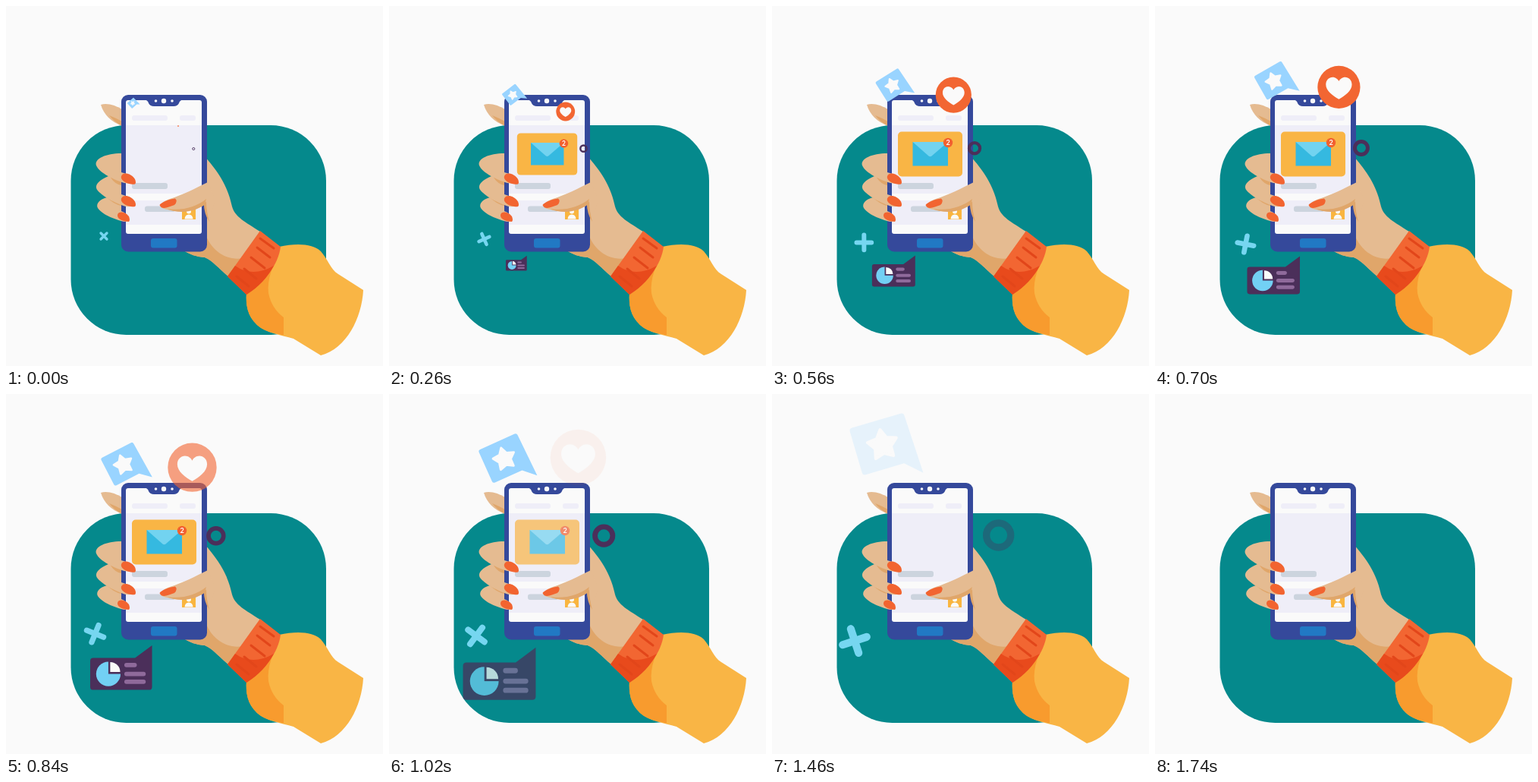
These frames come from a looping animation (497 px wide and 474 px high, 1.8 s). An HTML page:

```html
<!DOCTYPE html>
<html lang="en">
<head>
<meta charset="utf-8">
<title>Phone in hand</title>
<style>
html, body { margin: 0; width: 100%; height: 100%; overflow: hidden; background: #fafafa; }
svg { display: block; width: 497px; height: 474px; }
text { font: bold 9px Lato, Arial, sans-serif; }
.skin { fill: #e5bb91; }
.shade { fill: #e0a66a; }
.nail { fill: #f26430; }
.lilac { fill: #efeef8; }
.bar { fill: #ccd4de; }
.white { fill: #fafafa; }
.navy { fill: #35499b; }
.plum { fill: #4b2f5a; }
</style>
</head>
<body>
<svg viewBox="0 0 497 474">
  <rect x="85.500" y="157" width="336.500" height="276" rx="73" fill="#05898c"/>

  <!-- far finger and palm -->
  <path class="skin" d="M125 130C133 127 145 131 153 136V158C138 152 129 143 125 130Z"/>
  <path class="shade" d="M136 144Q146 148 153 152V158Q143 153 136 144Z"/>
  <path class="skin" d="M262 198C283 222 293 240 298 264C302 278 315 284 335 297L293 356C280 345 272 335 262 331C250 330 243 327 236 323L250 240Z"/>
  <path class="shade" d="M262 298C270 322 290 336 313 332L293 356C280 345 272 335 262 331C250 330 243 327 236 323Z"/>

  <!-- phone -->
  <rect class="navy" x="152" y="117" width="113" height="206.500" rx="9"/>
  <rect class="white" x="158" y="124" width="100" height="176" rx="3"/>
  <path class="navy" d="M183 123.500Q187 124 188 128Q190 132 195 132H221Q226 132 228 128Q229 124 233 123.500Z"/>
  <g class="white">
    <circle cx="197.500" cy="125" r="1.800"/><circle cx="208" cy="125" r="3.200"/><circle cx="219" cy="125" r="1.800"/>
  </g>
  <rect x="191" y="306" width="34.500" height="12.500" rx="3" fill="#2179c4"/>
  <g class="lilac">
    <rect x="166" y="144" width="47" height="7" rx="3"/>
    <rect x="229" y="144" width="21" height="7" rx="3"/>
    <rect x="158" y="157" width="100" height="90"/>
    <rect x="158" y="256" width="100" height="32"/>
  </g>
  <g class="bar">
    <rect x="166" y="233" width="47" height="8" rx="3"/>
    <rect x="183" y="263.500" width="40" height="7.500" rx="3"/>
  </g>
  <rect x="232" y="263" width="18" height="18" fill="#f9b53f"/>
  <g class="white">
    <circle cx="241" cy="270.500" r="3"/><path d="M235.500 280.500Q236 274.500 241 274.500T246.500 280.500Z"/>
  </g>

  <g id="card">
    <rect x="-42.500" y="-29.500" width="85" height="59" rx="5" fill="#f9b545"/>
    <rect x="-23" y="-16" width="46.500" height="31.500" fill="#35b9e0"/>
    <path d="M-23 -16H23.500L2 2.500Q0 4 -2 2.500Z" fill="#72d3f0"/>
    <circle cx="23.500" cy="-15" r="6.200" fill="#f2602f"/>
    <text x="23.500" y="-11.700" text-anchor="middle" fill="#fff">2</text>
  </g>

  <!-- front fingers -->
  <path class="skin" d="M152 254L133 252C123 255 119 260 120.500 265C125 274 143 281 156 284Q162 284 162 280Q160 273 152 270Z"/>
  <path class="shade" d="M133 252Q142 261 152 263V252Z"/>
  <path class="skin" d="M152 226L135 224C123 229 117 235 119.500 241C125 250 145 260 158 264Q168 265 170 260Q167 252 152 248Z"/>
  <path class="shade" d="M138 226Q144 235 152 236V226Z"/>
  <path class="skin" d="M152 194C132 194 116 201 119 210C123 220 143 229 156 233Q167 235 170 231Q167 222 152 219Z"/>
  <g class="nail">
    <path id="nail" d="M152 224C154 218 165 220 170 228Q172 233 170 234.500C164 236 150 231 152 224Z"/>
    <use href="#nail" y="29.500"/>
    <path d="M147 275C148 269 158 271 162 277Q164 282 162 284C156 284 146 281 147 275Z"/>
  </g>

  <!-- thumb -->
  <path class="skin" d="M266 232C250 240 232 249 216 254Q202 259 204 265C215 271 240 273 261 260Q262 272 268 284L276 255Z"/>
  <path class="shade" d="M212 267C232 270 250 265 264 254L261.500 262C245 273 225 273 212 267ZM261 261L264 257Q264 270 268 284Q261 274 261 261Z"/>
  <path class="nail" d="M202.500 262C204 259 216 254 223 253.500Q227 257 222 262C214 265 205 269 202.500 262Z"/>

  <!-- sleeve and cuff -->
  <path fill="#f9b545" d="M360 317C383 312 405 313 415 323C424 333 428 347 438 353L471 374C469 411 449 451 415 460L379 438C363 433 343 431 331 420C318 408 316 393 317 378Z"/>
  <path fill="#f89b2e" d="M360 326C352 340 344 360 346 378Q350 398 366 410V433.500C350 430 340 428 331 420C318 408 316 393 317 378Z"/>
  <path fill="#f26632" d="M335 296L362 317C359 340 341 365 317 380L292 356Z"/>
  <path fill="#e84a1c" d="M292 356L302 342Q325 358 353 342C345 357 333 370 317 380Z"/>
  <path stroke="#e2461a" stroke-width="3" stroke-linecap="round" d="M335 306L353 319M331 318L348 331M323 331L341 345M314 346L330 359M304 356L320 369"/>

  <!-- floating items -->
  <g id="chart">
    <path class="plum" d="M-38 -21.500H18.500L41.500 -38.500V17.500Q41.500 21.500 37.500 21.500H-38Q-42 21.500 -42 17.500V-17.500Q-42 -21.500 -38 -21.500Z"/>
    <circle cx="-17.500" r="16.500" fill="#72d0f4"/>
    <path class="plum" d="M-17.500 0V-17H0V0Z"/>
    <path class="white" d="M-15 -2.500V-16A13.500 13.500 0 0 1 -1.500 -2.500Z"/>
    <path stroke="#8f6a9b" stroke-width="6" stroke-linecap="round" d="M7 -12H18M7 0H30M7 10.500H30"/>
  </g>
  <path id="cross" d="M-16.500 0H16.500M0 -16.500V16.500" stroke="#76d6f0" stroke-width="10" stroke-linecap="round"/>
  <circle id="ring" r="15.500" fill="none" stroke="#4b2f5a" stroke-width="9"/>
  <g id="heart">
    <circle r="32" fill="#f26632"/>
    <path class="white" d="M0 18C-9 13 -19.500 5 -19.500 -4C-19.500 -11 -14.500 -15 -9.500 -15C-5 -15 -1.500 -12 0 -9C1.500 -12 5 -15 9.500 -15C14.500 -15 19.500 -11 19.500 -4C19.500 5 9 13 0 18Z"/>
  </g>
  <g id="star">
    <path fill="#99d4ff" d="M-32 -32.500H34Q38 -32.500 38 -28.500L40.500 50L20 31H-32Q-36 31 -36 27V-28.500Q-36 -32.500 -32 -32.500Z"/>
    <path id="starShape" class="white" stroke="#fafafa" stroke-width="4" stroke-linejoin="round"/>
  </g>
</svg>
<script>
const $ = id => document.getElementById(id);
const LOOP = 1800, STEP = 20, LAST = 1740;

const corners = Array.from({ length: 10 }, (_, i) => {
  const r = i % 2 ? 11 : 20, a = i * Math.PI / 5 + 0.12;
  return [r * Math.sin(a), -r * Math.cos(a)];
});
$("starShape").setAttribute("d", "M" + corners.join("L") + "Z");

// 1 until the first time, falling to 0 at the second
const fade = (s, from, to) => Math.max(0, Math.min(1, (to - s) / (to - from)));

function place(id, x, y, scale, turn, opacity) {
  const el = $(id);
  el.setAttribute("transform", `translate(${x} ${y}) rotate(${turn}) scale(${scale})`);
  el.setAttribute("opacity", opacity);
}

// Pose at s seconds: items drift outward at a steady speed while growing and turning
function draw(s) {
  const pop = 1 - (1 - Math.min(1, s / .35)) ** 2;
  place("card", 208.5, 195, pop, 0, fade(s, .94, 1.21));
  place("star", 167 - 14.5 * s, 128 - 41.8 * s, .15 + .59 * s, -42 + 17.5 * s, fade(s, 1.2, 1.525));
  place("heart", 227 + 22 * s, 158 - 73 * s, .035 + 1.45 * s - .35 * s * s, 0, fade(s, .71, 1.04));
  place("ring", 247.3 + 35.2 * s, 188 - 1.4 * s, .1 + .64 * s, 0, fade(s, 1.24, 1.58));
  place("cross", 129 - 13.7 * s, 303 + 15.1 * s, .34 + .46 * s, -45 + 80 * s, fade(s, 1.5, 1.74));
  place("chart", 173 - 17 * s - 9.5 * s * s, 331 + 38 * s + 8 * s * s, 1.33 * s - .2 * s * s, 0, fade(s, .92, 1.28));
}

const start = performance.now();
function tick() {
  const t = (performance.now() - start) % LOOP;
  draw(Math.min(LAST, Math.floor(t / STEP) * STEP) / 1000);
  requestAnimationFrame(tick);
}
tick();
</script>
</body>
</html>
```
